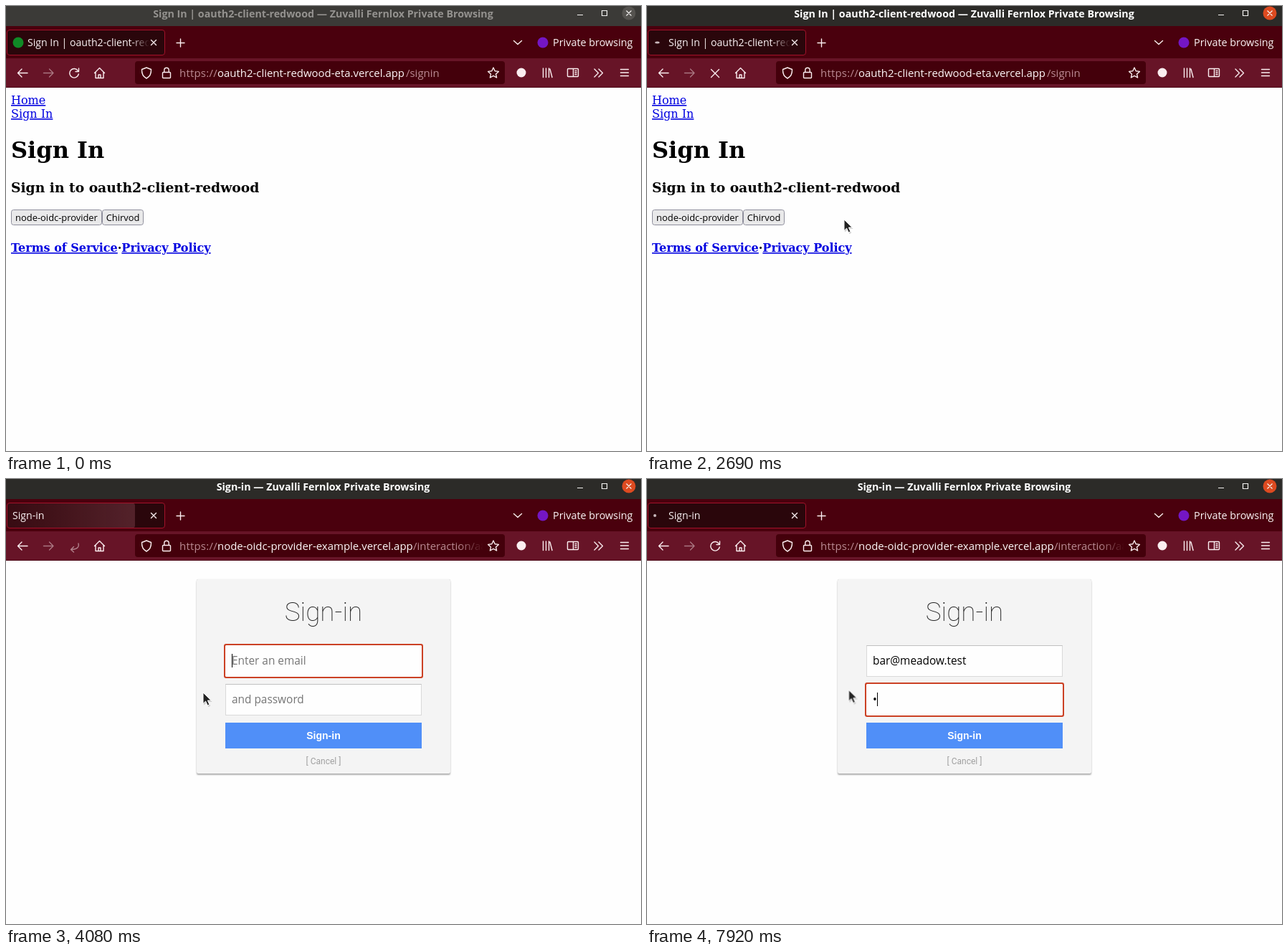
Recreate the animation shown at these times as an HTML page. Size 886 px wide and 621 px high, loop 8000 ms.

```html
<!DOCTYPE html>
<html lang="en">
<head>
<meta charset="utf-8">
<title>Sign In</title>
<style>
html, body { margin: 0; width: 100%; height: 100%; overflow: hidden; background: #fefefe; }
#stage { position: relative; width: 886px; height: 621px; overflow: hidden; }
#stage > svg { position: absolute; left: 0; top: 0; }
text, .field { font-family: "Open Sans", "Noto Sans", sans-serif; white-space: pre; }

/* Browser chrome */
.title { font-size: 14.25px; font-weight: 700; text-anchor: middle; fill: #fff; animation: titleInk 8s step-end infinite; }
.tab { font-size: 14.1px; fill: #fbf4f5; }
.ui { font-size: 14.4px; fill: #fbf4f5; }
.url { font-size: 14.95px; fill: #b98a92; }
.url .host { fill: #fdf8f8; }
.icons { fill: none; stroke: #fbeef0; stroke-width: 1.4; stroke-linecap: round; stroke-linejoin: round; }
.dim { opacity: .45; }
#bar { animation: barFill 8s step-end infinite; }
#close { animation: closeFill 8s step-end infinite; }

/* First page */
.page text { font-family: "DejaVu Serif", serif; font-size: 16px; }
.page .b { font-weight: 700; }
.page .link { fill: #0000e0; text-decoration: underline; }
.page .btn { font: 12.9px "Open Sans", "Noto Sans", sans-serif; text-anchor: middle; }
.page rect { fill: #e9e9ea; stroke: #8f8f9d; }
#hover { animation: hover 8s step-end infinite; }

/* Sign-in form */
#form { position: absolute; inset: 0; }
#form > * { position: absolute; box-sizing: border-box; }
.card { left: 266px; top: 140px; width: 354px; height: 271px; background: #f4f4f4; border-radius: 2px; box-shadow: 0 2px 2px rgba(0,0,0,.3), 0 0 1px rgba(0,0,0,.25); }
h1 { left: 266px; top: 164px; width: 354px; margin: 0; text-align: center; font: 100 36.8px/44px Roboto, sans-serif; color: #222; }
.field { left: 306px; width: 274px; height: 44px; padding-left: 8px; line-height: 42px; font-size: 15.4px; color: #000; background: #fefefe; border: 1px solid #d9d9d9; border-top-color: #c0c0c0; }
.field i { display: none; width: 1px; height: 19px; margin-right: -1px; background: #000; vertical-align: middle; position: relative; top: -1px; }
.field em { font-style: normal; color: #757575; }
.field.on { border-color: #fefefe; box-shadow: 0 0 0 1px #cb4124, inset 0 0 0 0 #cb4124; outline: 2px solid #cb4124; outline-offset: 0; border-radius: 1px; }
.field.on i { display: inline-block; }
#mail { top: 232px; }
#pass { top: 286px; }
.go { left: 306px; top: 340px; width: 274px; height: 36px; background: #508ff8; color: #fff; text-align: center; font: bold 14px/36px "Liberation Sans", Arial, sans-serif; }
.cancel { left: 266px; top: 384px; width: 354px; text-align: center; font: 12px/20px Roboto, sans-serif; color: #a0a0a0; }

/* Hard switches: 1% = 80 ms */
.preNav { animation: preNav 8s step-end infinite; }
.postNav { animation: postNav 8s step-end infinite; }
.oldPage { animation: oldPage 8s step-end infinite; }
.newPage { animation: newPage 8s step-end infinite; }
.idle { animation: idle 8s step-end infinite; }
.busy { animation: busy 8s step-end infinite; }
.hostLabel { animation: hostLabel 8s step-end infinite; }
.pageLabel { animation: pageLabel 8s step-end infinite; }
.status { animation: status 8s step-end infinite; }
.hook { animation: hook 8s step-end infinite; }
.reload { animation: reload 8s step-end infinite; }
.again { animation: again 8s step-end infinite; }
@keyframes barFill { 0% { fill: #3b3a37 } 11.5%, to { fill: #2c2b28 } }
@keyframes titleInk { 0% { fill: #94928f } 11.5%, to { fill: #fff } }
@keyframes closeFill { 0% { fill: #55534f } 11.5%, to { fill: #dd4a20 } }
@keyframes hover { 0% { opacity: 0 } 7.7% { opacity: 1 } 27%, to { opacity: 0 } }
@keyframes preNav { 0% { opacity: 1 } 39.375%, to { opacity: 0 } }
@keyframes postNav { 0% { opacity: 0 } 39.375%, to { opacity: 1 } }
@keyframes oldPage { 0% { opacity: 1 } 46.25%, to { opacity: 0 } }
@keyframes newPage { 0% { opacity: 0 } 46.25%, to { opacity: 1 } }
@keyframes idle { 0% { opacity: 1 } 27.9%, to { opacity: 0 } }
@keyframes busy { 0% { opacity: 0 } 27.9% { opacity: 1 } 50%, to { opacity: 0 } }
@keyframes hostLabel { 0% { opacity: 0 } 39.375% { opacity: 1 } 44.25%, to { opacity: 0 } }
@keyframes pageLabel {
  0% { opacity: 0; transform: translateX(21px) }
  44.25% { opacity: 1; transform: translateX(21px) }
  50% { opacity: 1; transform: none }
  99%, to { opacity: 1; transform: translateX(21px) }
}
@keyframes status { 0% { opacity: 0 } 40.3% { opacity: 1 } 49%, to { opacity: 0 } }
@keyframes hook { 0% { opacity: 0 } 50% { opacity: .5 } 52%, to { opacity: 0 } }
@keyframes reload { 0% { opacity: 1 } 27.9% { opacity: 0 } 52% { opacity: .5 } 56%, to { opacity: 1 } }
@keyframes again { 0% { opacity: 0 } 99%, to { opacity: 1 } }

/* Motion */
#dot { animation: slide calc(8s / 7) ease-in-out -1.112s infinite; }
@keyframes slide {
  0%, to { transform: translate(23px, 51px) }
  30% { transform: translate(14.5px, 51px) scale(1.6, .75) }
  50% { transform: translate(11px, 51px) }
  80% { transform: translate(19.5px, 51px) scale(1.6, .75) }
}
#burst { transform-origin: 2px 0; animation: burst 8s linear infinite; }
@keyframes burst {
  0%, 50% { transform: scaleX(0); opacity: 1 }
  51% { transform: scaleX(.81); opacity: 1 }
  51.9% { transform: none; opacity: .8 }
  56.5%, to { transform: none; opacity: 0 }
}
#pointer { animation: roam 8s linear infinite; }
@keyframes roam {
  0%, 2.87% { transform: translate(209px, -40px) }
  2.875% { transform: translate(209px, 37px) }
  4.8% { transform: translate(172px, 150px) }
  6.7% { transform: translate(128px, 265px) }
  7.7% { transform: translate(95px, 307px) }
  8.625%, 11.5% { transform: translate(78px, 304px) }
  12.5%, 25.9% { transform: translate(76px, 297px) }
  29% { transform: translate(190px, 299px) }
  32%, 51.5% { transform: translate(275px, 298px) }
  56.75%, to { transform: translate(281.5px, 294.5px) }
}
</style>
</head>
<body>
<div id="stage">
<svg width="886" height="621" viewBox="0 0 886 621">
  <defs>
    <linearGradient id="tabFade" gradientUnits="userSpaceOnUse" x1="174" x2="200">
      <stop stop-color="#fff"/><stop offset="1" stop-color="#000"/>
    </linearGradient>
    <linearGradient id="urlFade" gradientUnits="userSpaceOnUse" x1="632" x2="666">
      <stop stop-color="#fff"/><stop offset="1" stop-color="#000"/>
    </linearGradient>
    <linearGradient id="glow">
      <stop stop-color="#ff6a88" stop-opacity=".07"/><stop offset="1" stop-color="#ff9cb0" stop-opacity=".2"/>
    </linearGradient>
    <mask id="tabMask" maskUnits="userSpaceOnUse" x="0" y="30" width="200" height="42"><rect y="30" width="200" height="42" fill="url(#tabFade)"/></mask>
    <mask id="urlMask" maskUnits="userSpaceOnUse" x="230" y="76" width="436" height="34"><rect x="230" y="76" width="436" height="34" fill="url(#urlFade)"/></mask>
  </defs>

  <g class="page oldPage">
    <text x="7" y="137" class="link">Home</text>
    <text x="7" y="156" class="link">Sign In</text>
    <text x="7" y="212" class="b" style="font-size:32px">Sign In</text>
    <text x="7" y="260" class="b" style="font-size:18.72px">Sign in to oauth2-client-redwood</text>
    <rect x="7.5" y="284.5" width="126" height="21" rx="3"/>
    <rect x="134.5" y="284.5" width="57" height="21" rx="3"/>
    <rect id="hover" x="7.5" y="284.5" width="126" height="21" rx="3" style="fill:#cfcfd1;stroke:#73737f"/>
    <text x="70.5" y="300" class="btn">node-oidc-provider</text>
    <text x="163" y="300" class="btn">Chirvod</text>
    <text x="7" y="343" class="b"><tspan class="link">Terms of Service</tspan>·<tspan class="link">Privacy Policy</tspan></text>
  </g>

  <rect id="bar" width="886" height="29"/>
  <rect y="28" width="886" height="45" fill="#4a000d"/>
  <rect y="73" width="886" height="41" fill="#671427"/>
  <rect y="113" width="886" height="1" fill="#4d0a18"/>
  <text x="442.5" y="16" class="title"><tspan class="preNav">Sign In | oauth2-client-redwood — Zuvalli Fernlox Private Browsing</tspan></text>
  <g class="preNav"></g>

  <circle id="close" cx="869" cy="10" r="9.5"/>
  <path d="M797 12.5h8M831.5 6.5h7v7h-7zM865.5 6.5l7 7m0-7l-7 7" fill="none" stroke="#f4f3f1" stroke-width="1.2"/>

  <rect x="1.5" y="33.5" width="220" height="35" rx="3.5" fill="#2a060b" stroke="#a3122a"/>
  <rect id="burst" x="2" y="34" width="219" height="34" rx="3" fill="url(#glow)"/>
  <circle class="idle" cx="17" cy="51" r="7.5" fill="#108a26"/>
  <g class="busy"><ellipse id="dot" rx="2" ry="2" fill="#c9b9bc"/></g>
  <circle class="again" cx="11" cy="51" r="2" fill="#c9b9bc"/>
  <g mask="url(#tabMask)">
    <text x="30" y="56" class="tab preNav">Sign In | oauth2-client-redwood</text>
    <text x="30" y="56" class="tab hostLabel">node-oidc-provider-example</text>
    <text x="9" y="56" class="tab pageLabel">Sign-in</text>
  </g>
  <circle cx="749" cy="51" r="7.5" fill="#7416c4"/>
  <text x="763" y="56" class="ui">Private browsing</text>

  <rect x="180" y="77" width="516" height="32" rx="4" fill="#44000b"/>
  <g mask="url(#urlMask)" class="url">
    <text x="242" y="98.5" letter-spacing=".25">https://</text>
    <g class="preNav">
      <text x="295" y="98.5" class="host">oauth2-client-redwood-eta.vercel.app</text>
      <text x="558" y="98.5">/signin</text>
    </g>
    <g class="postNav">
      <text x="295" y="98.5" class="host">node-oidc-provider-example.vercel.app</text>
      <text x="568" y="98.5">/interaction/a8Kq2</text>
    </g>
  </g>
  <circle cx="719" cy="93" r="6.5" fill="#fbeef0"/>

  <g class="icons">
    <path d="M202.500 47.500l7 7m0-7l-7 7M238 51.500h11M243.500 46v11M708.500 48.500l5.500 5 5.500-5"/>
    <path d="M30 93.500H16.500m5.500-5.500l-5.500 5.500 5.500 5.500"/>
    <path class="dim" d="M52.500 93.500H66m-5.500-5.500l5.500 5.500-5.500 5.500"/>
    <path class="reload" d="M100.500 90.500A6.300 6.300 0 1 0 101.300 95M101.500 87v4.500H97"/>
    <path class="busy" d="M89.500 88.500l11 11m0-11l-11 11"/>
    <path class="hook" d="M101 90q2 8-10.500 8.500m4-4l-4 4 4 3.500"/>
    <path d="M123.500 93.500l7-7 7 7M125 92.500v8h11v-8M129 100.500v-4.500h3v4.500"/>
    <path d="M196 86l6.500 2.500c.3 6-1.500 10-6.500 12.500-5-2.500-6.800-6.500-6.500-12.500z"/>
    <path d="M219.500 92.500h9q1 0 1 1v6q0 1-1 1h-9q-1 0-1-1v-6q0-1 1-1zM220.800 92.500v-3a3.200 3.200 0 0 1 6.400 0v3"/>
    <path d="M680 86l2.200 4.800 5.200.6-3.900 3.500 1.100 5.100-4.600-2.600-4.600 2.600 1.100-5.100-3.900-3.500 5.200-.6z"/>
    <path d="M749.500 87v12.500M753.500 87v12.500M757.500 87v12.500M759 88l3 11.500"/>
    <path d="M784.500 87.500h13q1 0 1 1v9q0 1-1 1h-13q-1 0-1-1v-9q0-1 1-1zM791.500 87.500v11M794 90.500h2M794 93h2M794 95.500h2"/>
    <path d="M821 88l5.500 5.500-5.500 5.500M827 88l5.500 5.500-5.500 5.500M857.500 88.500h11M857.500 93h11M857.500 97.500h11"/>
  </g>
</svg>

<div id="form" class="newPage">
  <div class="card"></div>
  <h1>Sign-in</h1>
  <div class="field" id="mail"><span></span><i></i><em>Enter an email</em></div>
  <div class="field" id="pass"><span></span><i></i><em>and password</em></div>
  <div class="go">Sign-in</div>
  <div class="cancel">[ Cancel ]</div>
</div>

<svg width="886" height="621" viewBox="0 0 886 621">
  <text x="442.5" y="16" class="title"><tspan id="newTitle"></tspan></text>
  <g class="status">
    <path d="M-1 600.500H433.500q3 0 3 3V622H-1z" fill="#383734" stroke="#22211f"/>
    <text x="3" y="617" class="ui" style="font-size:14.25px">Transferring data from node-oidc-provider-example.vercel.app…</text>
  </g>
  <g id="pointer">
    <path d="M1 1.500v16l3.800-3.500 2.600 6 2.800-1.200-2.600-5.800h5z" fill="#000" opacity=".18"/>
    <path d="M0 0v15.500l3.600-3.400 2.600 5.900 2.700-1.200-2.500-5.700h4.900z" fill="#232323" stroke="#fff"/>
  </g>
</svg>
</div>
<script>
const LOOP = 8000;
const MAIL = "bar@meadow.test";
const KEYS = [4920, 5000, 5150, 5770, 6080, 6230, 6460, 6620, 6700, 6770, 6920, 7000, 7080, 7230, 7300];
const NAV = 3150, TAB = 7380, SECRET = 7770;
const $ = s => document.querySelector(s);
const oldTitle = $(".title tspan"), newTitle = $("#newTitle");
oldTitle.removeAttribute("class");
const OLD = oldTitle.textContent;

function fill(id, text, focused) {
  const box = $(id);
  box.classList.toggle("on", focused);
  box.querySelector("span").textContent = text;
  box.querySelector("em").hidden = text !== "";
}

function draw(t) {
  oldTitle.textContent = t < NAV ? OLD : "";
  newTitle.textContent = t < NAV ? "" : "Sign-in — Zuvalli Fernlox Private Browsing";
  fill("#mail", MAIL.slice(0, KEYS.filter(k => k <= t).length), t < TAB);
  fill("#pass", t < SECRET ? "" : "•", t >= TAB);
}

let start;
function tick(now) {
  start ??= now;
  draw((now - start) % LOOP);
  requestAnimationFrame(tick);
}
draw(0);
requestAnimationFrame(tick);
</script>
</body>
</html>
```
